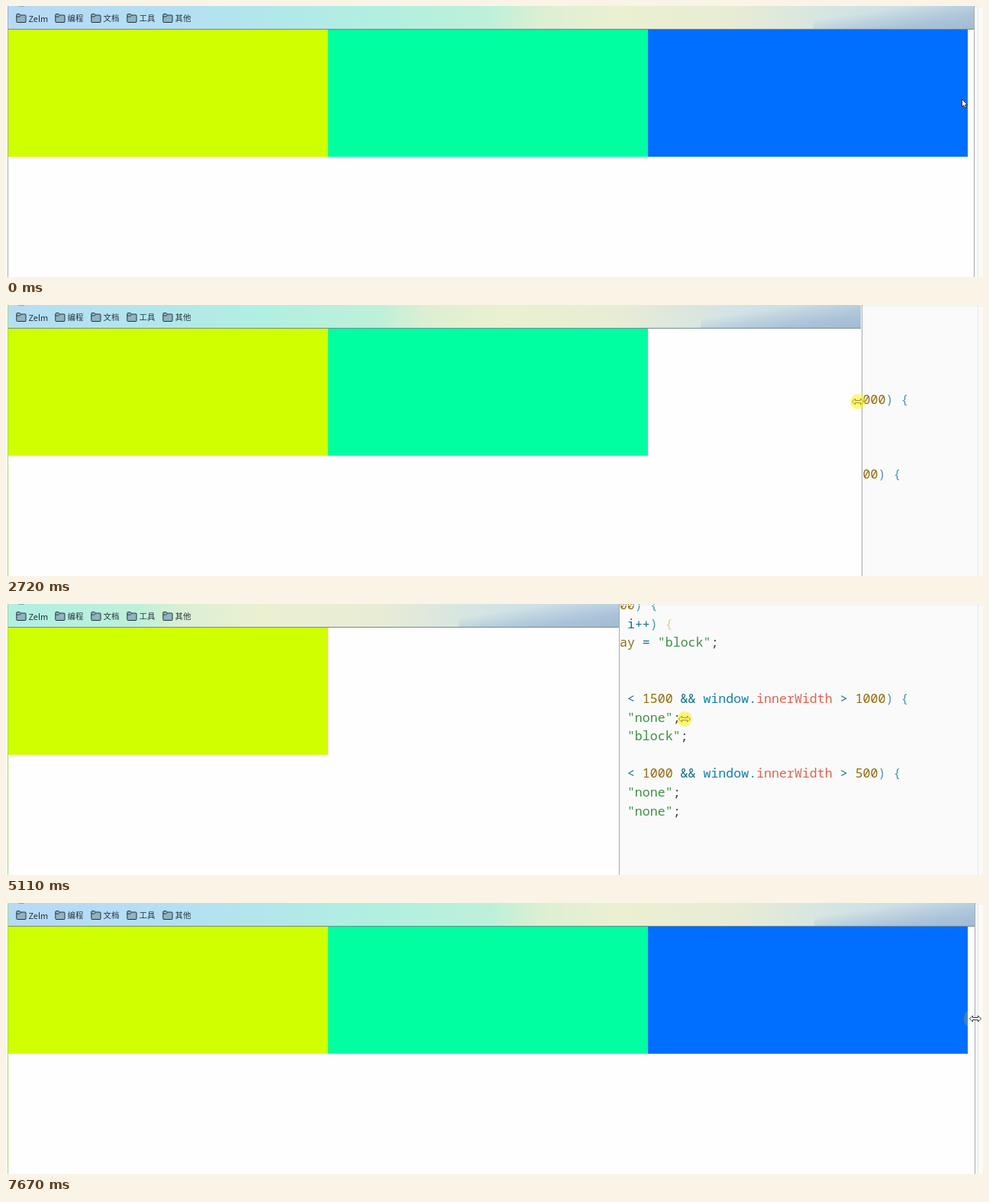
An HTML page for the animation above (8300 ms loop, 1280 px wide and 356 px high).

```html
<!DOCTYPE html>
<html lang="zh">
<head>
<meta charset="utf-8">
<title>Responsive boxes</title>
<style>
  html, body { margin: 0; width: 100%; height: 100%; overflow: hidden; }
  body { position: relative; background: #fafafa; }
  div, svg { position: absolute; }
  #code { left: 525px; top: -10.8px; margin: 0; position: absolute; white-space: pre;
    font: 16.6px/24.58px "Noto Sans Mono", monospace; color: #4a9aae; }
  .string { color: #3f8f45; }
  .number { color: #916a0a; }
  .object { color: #1580ac; }
  .size { color: #dc6450; }
  .prop { color: #85701c; }
  .op { color: #176f8c; }
  .punct { color: #383a42; }
  .loop { color: #e8cf86; }
  #topline { left: 0; top: 1px; width: 1280px; height: 1px; background: #eceff1; }
  #ruler { left: 1273px; top: 0; width: 1px; height: 356px; background: #e6e6e6; }
  #margin { left: 0; top: 0; width: 2px; height: 356px; background: #fdfdfd; }
  #window { left: 2px; top: 0; height: 356px; box-sizing: border-box; background: #fefefe;
    border: solid #a9a9a9; border-width: 0 1px; overflow: hidden; }
  #page { left: 0; top: 0; height: 356px; overflow: hidden; }
  #bar { right: 0; top: 0; width: 1267px; height: 30px; border-bottom: 1px solid #758b90;
    background: linear-gradient(95deg, #b7d9f7, #b4e0f3 18%, #b1efe1 38%, #bdf0da 50%,
      #dcefd3 55%, #ebf0d1 63%, #e8ecd5 75%, #d3e4e4 86%, #c4d9e5); }
  #shade { right: 0; top: 0; width: 210px; height: 30px;
    background: linear-gradient(to bottom right, transparent 30%, #a9c2d8 75%, #a3bbd2); }
  #tab { left: 13px; top: 0; width: 8px; height: 1px; background: #7fb1b5; }
  .mark { top: 6px; color: #26343c; white-space: nowrap;
    font: 10.4px/20px "Noto Sans CJK SC", "Noto Sans CJK", sans-serif; }
  .mark span { position: absolute; left: 16.5px; }
  .mark:first-of-type { font-size: 11px; }
  .mark svg { left: 0; top: 3px; }
  .box { top: 31px; width: 419px; height: 167px; }
  #ghost { left: 1255px; top: 142px; width: 5px; height: 20px; background: #3c83ba;
    border-radius: 5px 0 0 5px / 10px 0 0 10px; }
  #overlay { left: 0; top: 0; }
</style>
</head>
<body>
<pre id="code"></pre>
<div id="topline"></div>
<div id="ruler"></div>
<div id="margin"></div>
<div id="window">
  <div id="page">
    <div id="bar"><div id="shade"></div></div>
    <div id="tab"></div>
    <div id="marks"></div>
    <div class="box" style="left:0;background:#d0ff00"></div>
    <div class="box" id="middle" style="left:419px;background:#00ffa0"></div>
    <div class="box" id="last" style="left:838px;background:#006eff"></div>
  </div>
</div>
<div id="ghost"></div>
<svg id="overlay" width="1280" height="356">
  <g id="pointer" stroke="#222" fill="#fff">
    <path id="arrow" d="M.5 .5V10.5L2.8 8.4 4.3 12 6 11.3 4.5 7.8H7.6Z" stroke-width=".9"/>
    <path id="resize" d="M-7.5 0L-3.5-4V-1.5H3.5V-4L7.5 0 3.5 4V1.5H-3.5V4Z" stroke-width=".9"/>
    <circle id="press" r="10" fill="#fff000" fill-opacity=".52" stroke="none"/>
  </g>
</svg>
<script>
const $ = id => document.getElementById(id);
const LOOP = 8300;

const script = [
  '  if (window.innerWidth > 1500) {',
  '    for (i=0;i<items.length; i++) {',
  '        items[i].style.display = "block";',
  '    }',
  '',
  '} else if (window.innerWidth < 1500 && window.innerWidth > 1000) {',
  '    items[2].style.display = "none";',
  '    items[1].style.display = "block";',
  '',
  '} else if (window.innerWidth < 1000 && window.innerWidth > 500) {',
  '    items[2].style.display = "none";',
  '    items[1].style.display = "none";'
];
const tokens = [
  ['string', /^"\w+"/], ['number', /^\d+/], ['object', /^window\.?/], ['size', /^innerWidth/],
  ['prop', /^(style|display)/], ['op', /^(&&|\+\+|[<>=]|i(?=\+))/], ['punct', /^;/],
  ['plain', /^(\w+|.)/s]
];

function highlight(text) {
  while (text) {
    const [name, rule] = tokens.find(([, rule]) => rule.test(text));
    const span = document.createElement('span');
    span.textContent = text.match(rule)[0];
    span.className = name === 'plain' && /^\{\n {8}/.test(text) ? 'loop' : name;
    $('code').append(span);
    text = text.slice(span.textContent.length);
  }
}
highlight(script.join('\n'));

const folder = `<svg width="14" height="14" fill="#8fb3c0" stroke="#26343c">
  <path d="M.8 11.5V2.5Q.8 1.5 1.8 1.5H5L6.5 3H12Q13 3 13 4V11.5Q13 12.5 12 12.5H1.8Q.8 12.5 .8 11.5ZM.8 5H5L6.5 3"/></svg>`;
$('marks').innerHTML = [['Zelm', 10], ['编程', 61], ['文档', 108], ['工具', 155], ['其他', 202]]
  .map(([label, x]) => `<div class="mark" style="left:${x}px">${folder}<span>${label}</span></div>`).join('');

// time, pointer x, pointer y
const pointerTrack = [
  [0, 1252, 122], [320, 1252, 122], [720, 1266, 129], [950, 1266, 129], [1110, 1268, 128],
  [1550, 1268, 127], [1690, 1256, 127], [2120, 1230, 127], [2270, 1230, 127], [2720, 1116, 127],
  [3080, 1031, 127], [3470, 889, 129], [3910, 806, 133], [4420, 698, 145], [4770, 790, 150],
  [5110, 889, 151], [5610, 1046, 152], [6110, 1215, 153], [6410, 1241, 153], [6530, 1243, 153],
  [7250, 1270, 152]
];
// time, right side of the window frame, right end of the painted page
const windowTrack = [
  [0, 1268, 1268], [1550, 1268, 1268], [1690, 1267, 1256], [2120, 1238, 1237], [2270, 1238, 1237],
  [2720, 1121, 1120], [3080, 1040, 1032], [3470, 916, 896], [3930, 815, 806], [4420, 700, 697],
  [4600, 700, 700], [5110, 803, 803], [5640, 1000, 998], [6110, 1200, 1198], [6410, 1238, 1238],
  [6530, 1242, 1242], [7250, 1269, 1269]
];

function sample(track, t) {
  const next = track.findIndex(key => key[0] > t);
  if (next < 0) return track.at(-1).slice(1);
  const a = track[next - 1], b = track[next];
  const k = (t - a[0]) / (b[0] - a[0]);
  return [1, 2].map(i => a[i] + (b[i] - a[i]) * k);
}

const show = (id, visible) => $(id).style.display = visible ? '' : 'none';
const between = (t, from, to) => t >= from && t < to;

function draw(now) {
  const t = now % LOOP;
  const [x, y] = sample(pointerTrack, t);
  const [frame, page] = sample(windowTrack, t).map(Math.round);
  const settled = between(t, 2600, 3000) || between(t, 4800, 5200) || t >= 7300;

  $('window').style.width = frame - 1 + 'px';
  $('page').style.width = page - 3 + 'px';
  $('window').style.borderLeftColor = t < 1500 ? '#a9a9a9' : '#a5d860';
  $('window').style.borderRightColor = t < 1500 || settled ? '#a9a9a9' : '#a5d860';
  show('middle', frame > 840);
  show('last', frame > 1258);

  $('pointer').setAttribute('transform', `translate(${Math.round(x)} ${Math.round(y)})`);
  show('arrow', t < 600);
  show('resize', t >= 600);
  show('press', between(t, 1500, 7670));
  show('ghost', t >= 7670);
  requestAnimationFrame(draw);
}
draw(0);
</script>
</body>
</html>
```
